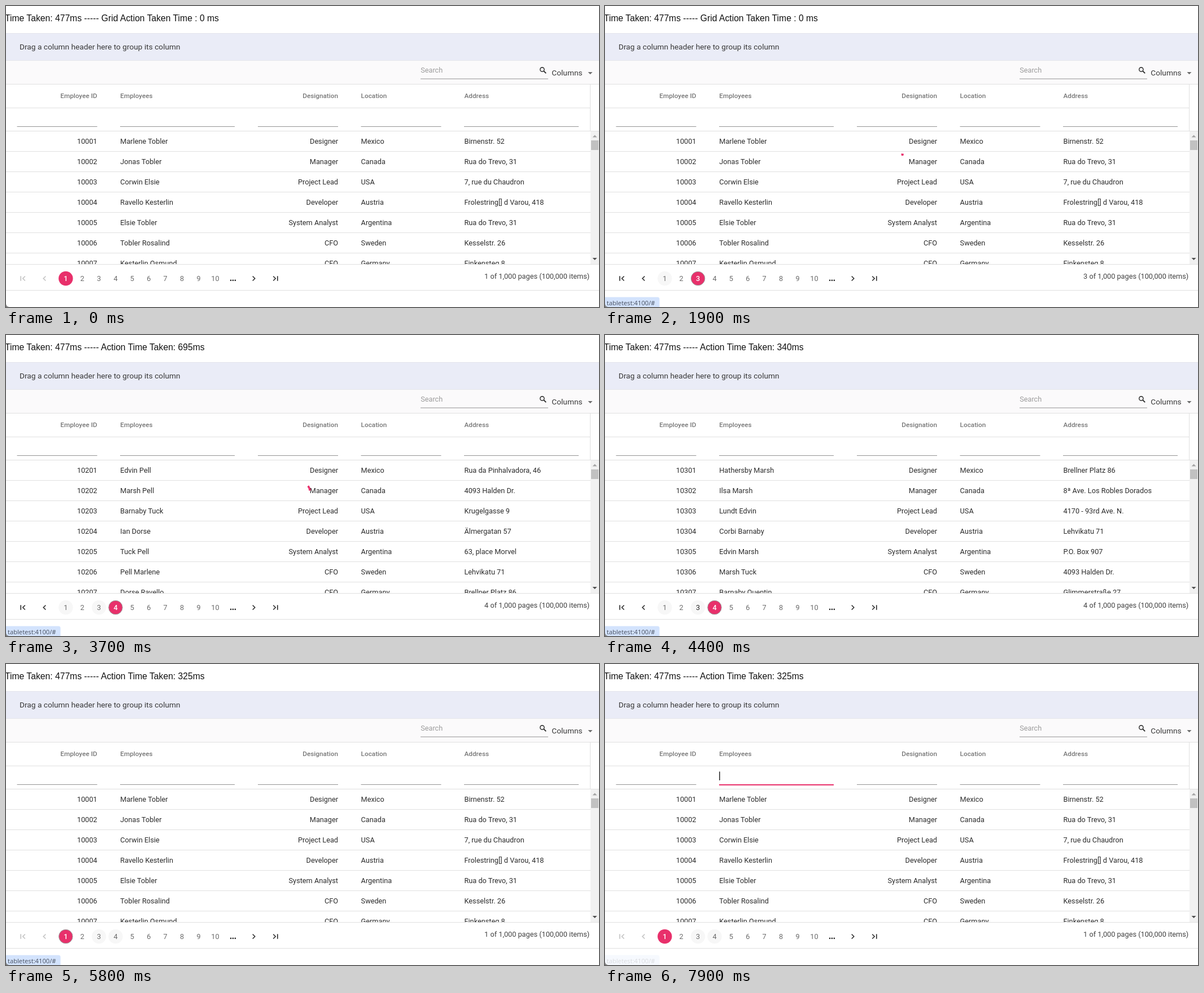
An HTML page for the animation above (8 s loop, 1050 by 533 pixels).

```html
<!DOCTYPE html>
<html lang="en">
<head>
<meta charset="utf-8">
<title>Data grid paging</title>
<style>
html, body { margin: 0; width: 100%; height: 100%; overflow: hidden; background: #fff; }
svg { display: block; width: 100%; height: 100%; }
text { font-family: Roboto, sans-serif; font-size: 12.72px; fill: #2c2c2c; white-space: pre; }
.title { font-family: "Liberation Sans", Arial, sans-serif; font-size: 15.7px; fill: #111; }
.big { font-size: 13.7px; fill: #383838; }
.head { font-size: 11.74px; font-weight: 500; fill: #777; }
.hint { fill: #9c9c9c; }
.tip { font-family: "Open Sans", sans-serif; font-size: 11.2px; fill: #454d5c; }
</style>
</head>
<body>
<svg id="stage" viewBox="0 0 1050 533" xmlns="http://www.w3.org/2000/svg">
  <g id="base"></g>
  <g id="live"></g>
</svg>
<script>
const LOOP = 8000, STEP = 100;
const PINK = '#e8306b', RULE = '#e0e0e0';

const columns = [
  { name: 'Employee ID', x: 161.5, end: true, from: 19.5, to: 161.5 },
  { name: 'Employees', x: 202.3, from: 202, to: 405 },
  { name: 'Designation', x: 588, end: true, from: 446, to: 588 },
  { name: 'Location', x: 628.6, from: 628.5, to: 770.5 },
  { name: 'Address', x: 811.5, from: 811, to: 1014 }
];
const roles = ['Designer', 'Manager', 'Project Lead', 'Developer', 'System Analyst', 'CFO', 'CFO'];
const places = ['Mexico', 'Canada', 'USA', 'Austria', 'Argentina', 'Sweden', 'Germany'];
const people = {
  1: ['Marlene Tobler', 'Jonas Tobler', 'Corwin Elsie', 'Ravello Kesterlin',
      'Elsie Tobler', 'Tobler Rosalind', 'Kesterlin Osmund'],
  3: ['Edvin Pell', 'Marsh Pell', 'Barnaby Tuck', 'Ian Dorse',
      'Tuck Pell', 'Pell Marlene', 'Dorse Ravello'],
  4: ['Hathersby Marsh', 'Ilsa Marsh', 'Lundt Edvin', 'Corbi Barnaby',
      'Edvin Marsh', 'Marsh Tuck', 'Barnaby Quentin']
};
const streets = {
  1: ['Birnenstr. 52', 'Rua do Trevo, 31', '7, rue du Chaudron', 'Frolestring[] d Varou, 418',
      'Rua do Trevo, 31', 'Kesselstr. 26', 'Finkensteg 8'],
  3: ['Rua da Pinhalvadora, 46', '4093 Halden Dr.', 'Krugelgasse 9', 'Älmergatan 57',
      '63, place Morvel', 'Lehvikatu 71', 'Brellner Platz 86'],
  4: ['Brellner Platz 86', '8ª Ave. Los Robles Dorados', '4170 - 93rd Ave. N.', 'Lehvikatu 71',
      'P.O. Box 907', '4093 Halden Dr.', 'Glimmerstraße 27']
};

// [start time, value] pairs; the latest started one holds
const shownPage = [[0, 1], [2600, 3], [3800, 4], [5800, 1]];
const chosenPage = [[0, 1], [1900, 3], [3400, 4], [5500, 1]];
const focusPage = [[0, 0], [1700, 3], [3200, 4], [5200, 1], [7600, 0]];
const hoverPage = [[0, 0], [800, 5], [900, 4], [1100, 3], [2600, 4], [4400, 3], [4500, 2], [4800, 1], [7600, 0]];
const actionText = [
  [0, 'Grid Action Taken Time : 0 ms'],
  [2600, 'Action Time Taken: 695ms'],
  [3800, 'Action Time Taken: 340ms'],
  [5800, 'Action Time Taken: 325ms']
];
const spins = [
  { from: 1900, to: 2600, start: 1890, hold: 2400 },
  { from: 3400, to: 3800, start: 3470, hold: 3800 },
  { from: 5500, to: 5800, start: 5490, hold: 5800 }
];

const at = (track, t) => track.reduce((v, [from, value]) => t >= from ? value : v, null);
const clamp = v => Math.min(1, Math.max(0, v));
const rect = (x, y, w, h, fill) => `<rect x="${x}" y="${y}" width="${w}" height="${h}" fill="${fill}"/>`;
const path = (d, extra) => `<path d="${d}" ${extra}/>`;
const text = (s, x, y, extra = '') => `<text x="${x}" y="${y}" ${extra}>${s}</text>`;
const anchor = c => c.end ? 'text-anchor="end"' : '';
const line = (d, color, w = 1.7) => path(d, `fill="none" stroke="${color}" stroke-width="${w}"`);

function drawBase() {
  let s = rect(0, 0, 1050, 533, '#fff');
  s += rect(0, 48, 1050, 48, '#eaecf7') + rect(0, 48, 1050, 1, '#e4e5ec');
  s += text('Drag a column header here to group its column', 24, 76.8, 'class="big"');

  s += rect(0, 96, 1050, 42, '#fbfafb') + rect(0, 96, 1050, 1, '#e6e6ea');
  s += text('Search', 734.2, 118, 'class="hint"') + rect(734, 128.5, 226, 1, '#949494');
  s += '<circle cx="949.4" cy="112.4" r="3.6" fill="none" stroke="#222" stroke-width="1.4"/>';
  s += line('M951.9 114.9L956.2 119.2', '#222', 1.7);
  s += text('Columns', 966.3, 123.4, 'class="big"');
  s += path('M1030.5 117h8l-4 4z', 'fill="#6a6a6a"');

  s += [138, 180, 221].map(y => rect(0, y, y < 150 ? 1050 : 1035, 1, RULE)).join('');
  s += rect(1034, 138, 1, 84, RULE) + rect(1035, 221, 15, 1, RULE);
  for (const c of columns) {
    s += text(c.name, c.x, 163.2, `class="head" ${anchor(c)}`);
    s += rect(c.from, 213, c.to - c.from, 1, '#949494');
  }
  for (let i = 1; i < 7; i++) s += rect(0, 221 + 36 * i, 1035, 1, RULE);

  s += rect(1035, 222, 15, 235, '#f1f1f1') + rect(1036, 238, 13, 17, '#c1c1c1');
  s += path('M1038.5 232.5h8l-4-4z', 'fill="#a3a3a3"') + path('M1038.5 446h8l-4 4z', 'fill="#505050"');

  s += rect(0, 457, 1050, 1, RULE) + rect(0, 503, 1050, 1, RULE);
  for (let i = 0; i < 3; i++) s += rect(396.9 + 3.9 * i, 484.6, 2.3, 2.3, '#222');
  s += line('M436.7 478.5L440.7 482.5L436.7 486.5', '#333');
  s += line('M473.2 478.5L477.2 482.5L473.2 486.5M480.8 478.3V486.7', '#333');
  return s + '<clipPath id="body"><rect x="0" y="222" width="1035" height="235"/></clipPath>';
}

function drawRows(page) {
  let s = '';
  for (let i = 0; i < 7; i++) {
    const cells = [10001 + (page - 1) * 100 + i, people[page][i], roles[i], places[i], streets[page][i]];
    columns.forEach((c, j) => s += text(cells[j], c.x, 244 + 36 * i, anchor(c)));
  }
  return `<g clip-path="url(#body)">${s}</g>`;
}

function drawPager(t) {
  const chosen = at(chosenPage, t), focus = at(focusPage, t), hover = at(hoverPage, t);
  const used = { 1: t >= 1900, 3: t >= 3400, 4: t >= 5500 };
  const nav = chosen === 1 ? '#c4c4c4' : '#333';
  let s = line('M26.2 478.3V486.7M33.8 478.5L29.8 482.5L33.8 486.5', nav);
  s += line('M70.3 478.5L66.3 482.5L70.3 486.5', nav);
  for (let n = 1; n <= 10; n++) {
    const x = 105.8 + 29.4 * (n - 1), on = n === chosen, ring = n === focus;
    if (on || ring || used[n]) {
      s += `<circle cx="${x}" cy="482.5" r="${ring ? 12.2 : 12.7}" fill="${on ? PINK : '#f7f7f7'}"
        stroke="${ring ? '#999' : 'none'}"/>`;
    }
    const color = on ? '#fff' : n === hover ? '#262626' : '#6b6b6b';
    s += text(n, x, 487, `text-anchor="middle" style="fill:${color};font-weight:${on ? 500 : 400}"`);
  }
  return s + text(`${chosen} of 1,000 pages (100,000 items)`, 1033.2, 483, 'text-anchor="end" style="fill:#424242"');
}

// Arc that lengthens by smootherstep while the whole ring turns
function drawSpinner(t) {
  const spin = spins.find(p => t >= p.from && t < p.to);
  if (!spin) return '';
  const ms = Math.max(0, Math.min(t, spin.hold) - spin.start), p = clamp(ms / 1333);
  const grow = p * p * p * (p * (6 * p - 15) + 10);
  const r = 13, round = 2 * Math.PI * r, len = round * Math.min(0.75, 0.05 + 1.48 * grow);
  return `<circle cx="525" cy="276" r="${r}" fill="none" stroke="${PINK}" stroke-width="3.5"
    stroke-dasharray="${len} ${round}" transform="rotate(${ms / 1568 * 360 - 94} 525 276)"/>`;
}

function drawTip(t) {
  const alpha = t < 7600 ? clamp((t - 700) / 500) : clamp(1 - (t - 7500) / 500);
  const s = path('M0 515.5H93Q96.5 515.5 96.5 519V533H0Z', 'fill="#d3e3fd"') +
    text('tabletest:4100/#', 3, 530.3, 'class="tip"');
  return `<g opacity="${alpha}">${s}</g>` + path('M0 527A6 6 0 0 0 6 533H0Z', 'fill="#858585"');
}

function drawFilter(t) {
  if (t < 7600) return '';
  const half = 101.5 * clamp((t - 7500) / 400);
  return rect(303.5 - half, 213, 2 * half, 2, PINK) + rect(202.2, 190.5, 1.4, 15.5, '#111');
}

const live = document.getElementById('live');
document.getElementById('base').innerHTML = drawBase();

let last = -1;
function render(ms) {
  const t = Math.floor(ms % LOOP / STEP) * STEP;
  if (t === last) return;
  last = t;
  live.innerHTML = text('Time Taken: 477ms ----- ' + at(actionText, t), -2, 26.6, 'class="title"') +
    drawRows(at(shownPage, t)) + drawPager(t) + drawSpinner(t) + drawFilter(t) + drawTip(t);
}

let begin;
function tick(now) {
  begin ??= now;
  render(now - begin);
  requestAnimationFrame(tick);
}
render(0);
requestAnimationFrame(tick);
</script>
</body>
</html>
```
